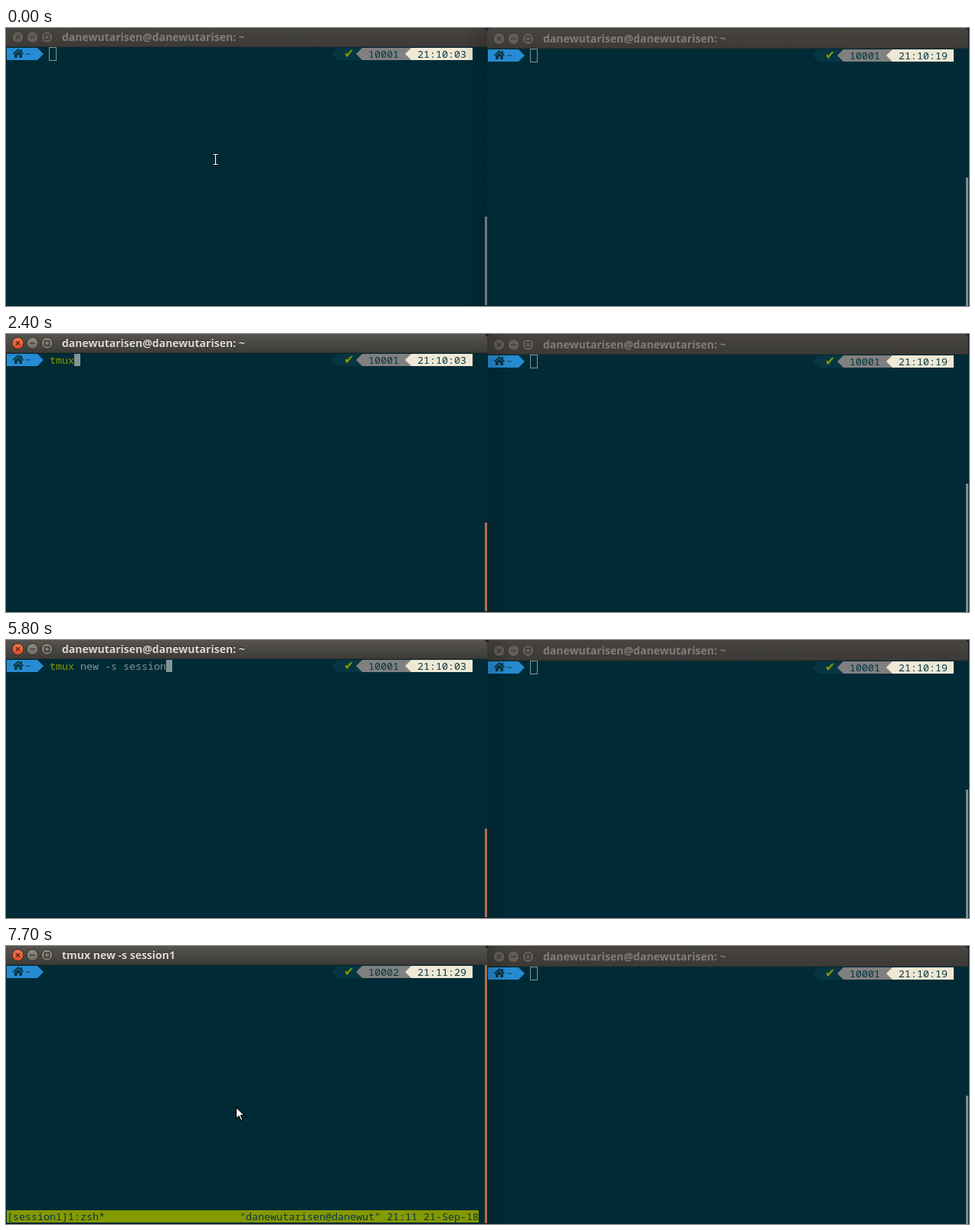
Recreate the animation shown at these times as an HTML page with a canvas. Size 1257 by 364 pixels, loop 8000 ms.

```html
<!DOCTYPE html>
<html lang="en">
<head>
<meta charset="utf-8">
<title>Two terminals</title>
<style>
  html, body { margin: 0; width: 1257px; height: 364px; overflow: hidden; background: #002b36; }
  canvas { display: block; }
</style>
</head>
<body>
<canvas id="stage" width="1257" height="364"></canvas>
<script>
const ctx = document.getElementById('stage').getContext('2d');
const LOOP = 8000;
const CELL = 8, ROW = 16;
const MONO = '13.333px "Noto Sans Mono", monospace';
const TITLE = 'bold 14px "Open Sans", sans-serif';
const USER = 'danewutarisen';
const HOST_TITLE = `${USER}@${USER}: ~`;
const COMMAND = 'tmux new -s session1';

const C = {
  bg: '#002b36', dark: '#073642', text: '#839496', green: '#859900', blue: '#268bd2',
  grey: '#808080', cream: '#eee8d5', error: '#cb4b16', scroll: '#7f9094', scrollOn: '#bb6a4b'
};

// [time, characters typed]
const KEYS = [
  [2000, 1], [2100, 2], [2300, 3], [2400, 4], [2800, 5], [3000, 6], [3100, 7], [3200, 8],
  [3600, 9], [3800, 10], [4600, 11], [4800, 12], [4900, 13], [5100, 14], [5500, 15],
  [5600, 16], [5700, 18], [5800, 19], [6700, 20]
];
const FOCUS = 800, ENTER = 7200, PROMPT = 7500;
const CURSOR_OFF = [[1300, 1900], [6400, 6700], [7700, 8000]];

function rect(x, y, w, h, color) {
  ctx.fillStyle = color;
  ctx.fillRect(x, y, w, h);
}

function poly(points, color) {
  ctx.fillStyle = color;
  ctx.beginPath();
  points.forEach(([x, y]) => ctx.lineTo(x, y));
  ctx.closePath();
  ctx.fill();
}

function write(text, x, y, color, font = MONO) {
  ctx.font = font;
  ctx.fillStyle = color;
  ctx.fillText(text, x, y);
}

function gradient(x0, y0, x1, y1, from, to) {
  const g = ctx.createLinearGradient(x0, y0, x1, y1);
  g.addColorStop(0, from);
  g.addColorStop(1, to);
  return g;
}

function button(x, y, kind, active) {
  const close = kind === 'close';
  ctx.fillStyle = !active ? '#625e57'
    : close ? gradient(0, y - 8, 0, y + 8, '#f47a55', '#e04a1e')
    : gradient(0, y - 8, 0, y + 8, '#8f8c82', '#6d6a61');
  ctx.strokeStyle = active ? '#2e2c28' : '#35332f';
  ctx.lineWidth = 1;
  ctx.beginPath();
  ctx.arc(x, y, 7.5, 0, Math.PI * 2);
  ctx.fill();
  ctx.stroke();

  ctx.strokeStyle = active ? (close ? '#5a1d0b' : '#35332e') : '#3a3833';
  ctx.lineWidth = 1.3;
  ctx.beginPath();
  if (close) {
    ctx.moveTo(x - 2.5, y - 2.5); ctx.lineTo(x + 2.5, y + 2.5);
    ctx.moveTo(x + 2.5, y - 2.5); ctx.lineTo(x - 2.5, y + 2.5);
  } else if (kind === 'min') {
    ctx.moveTo(x - 3.5, y); ctx.lineTo(x + 3.5, y);
  } else {
    ctx.rect(x - 3, y - 3, 6, 6);
  }
  ctx.stroke();
}

function titleBar(x, width, height, title, active) {
  const mid = height - 13;
  ctx.fillStyle = active
    ? gradient(0, 0, 0, height, '#56544d', '#3d3b37')
    : gradient(0, 0, 0, height, '#484540', '#3c3a36');
  ctx.beginPath();
  ctx.roundRect(x, 0, width, height, [x ? 5 : 0, 5, 0, 0]);
  ctx.fill();
  rect(x, height - 1, width, 1, '#33312d');
  button(x + 15.5, mid, 'close', active);
  button(x + 34.5, mid, 'min', active);
  button(x + 53.5, mid, 'max', active);
  if (active) write(title, x + 73, mid + 4, '#24231f', TITLE);
  write(title, x + 73, mid + 5, active ? '#dfdbd2' : '#807d78', TITLE);
}

function home(x, y) {
  ctx.strokeStyle = C.dark;
  ctx.lineWidth = 1.8;
  ctx.beginPath();
  ctx.moveTo(x + .5, y + 8);
  ctx.lineTo(x + 7, y + 2.3);
  ctx.lineTo(x + 13.5, y + 8);
  ctx.stroke();
  rect(x + 10, y + 2, 2, 4, C.dark);
  poly([[x + 2, y + 8.7], [x + 7, y + 4.4], [x + 12, y + 8.7], [x + 12, y + 13],
    [x + 8.3, y + 13], [x + 8.3, y + 9.5], [x + 5.7, y + 9.5], [x + 5.7, y + 13],
    [x + 2, y + 13]], C.dark);
}

function leftArrow(x, y, color) {
  poly([[x + CELL, y], [x, y + ROW / 2], [x + CELL, y + ROW]], color);
}

function prompt(x, y, count, clock) {
  const base = y + 13;
  rect(x, y, 40, ROW, C.blue);
  poly([[x + 40, y], [x + 48, y + ROW / 2], [x + 40, y + ROW]], C.blue);
  home(x + 8, y);
  write('~', x + 24, base, C.dark);

  leftArrow(x + 424, y, C.dark);
  rect(x + 432, y, 32, ROW, C.dark);
  write('✔', x + 440, base, C.green, '16px "DejaVu Sans", sans-serif');
  leftArrow(x + 456, y, C.grey);
  rect(x + 464, y, 64, ROW, C.grey);
  write(count, x + 472, base, C.dark);
  leftArrow(x + 520, y, C.cream);
  rect(x + 528, y, 80, ROW, C.cream);
  write(clock, x + 536, base, C.dark);
}

function hollowCursor(x, y) {
  ctx.strokeStyle = C.text;
  ctx.lineWidth = 1;
  ctx.strokeRect(x - .5, y - .5, CELL + 1, ROW + 1);
}

function command(x, y, t, typed) {
  const base = y + 13;
  const name = COMMAND.slice(0, Math.min(typed, 4));
  if (typed < 4) write(name, x, base, C.error, 'bold ' + MONO);
  else write(name, x, base, C.green);
  write(COMMAND.slice(4, typed), x + 4 * CELL, base, C.text);
  if (typed === 13) rect(x + 12 * CELL, base + 1, CELL, 1, C.text);
}

function statusBar(ready) {
  const name = ready ? `${USER}@${USER.slice(0, 7)}` : USER;
  const right = `"${name}" 21:11 21-Sep-18`;
  rect(1, 346, 616, ROW, C.green);
  write('[session1]1:zsh*', 1, 359, C.dark);
  write(right, 617 - right.length * CELL, 359, C.dark);
}

function beam(x, y) {
  const shape = () => {
    ctx.beginPath();
    ctx.moveTo(x - 2.5, y - 6.5); ctx.lineTo(x + 3.5, y - 6.5);
    ctx.moveTo(x - 2.5, y + 6.5); ctx.lineTo(x + 3.5, y + 6.5);
    ctx.moveTo(x + .5, y - 6.5); ctx.lineTo(x + .5, y + 6.5);
    ctx.stroke();
  };
  ctx.lineWidth = 3;
  ctx.strokeStyle = '#00141a';
  shape();
  ctx.lineWidth = 1.2;
  ctx.strokeStyle = '#fff';
  shape();
}

function arrow(x, y) {
  const points = [[0, 0], [0, 15], [3.6, 11.8], [6.2, 17.5], [8.6, 16.4], [6, 10.8], [10.5, 10.6]]
    .map(([dx, dy]) => [x + dx, y + dy]);
  poly(points, '#fff');
  ctx.strokeStyle = '#000';
  ctx.lineWidth = 1.2;
  ctx.stroke();
}

function pointer(t) {
  if (t >= ENTER) return arrow(300.5, 211);
  if (t >= 2000) return;
  const step = Math.max(0, Math.min(4, Math.floor(t / 100) - 1)) / 4;
  beam(Math.round(273 + 29 * step), 172 + 40 * step);
}

function leftWindow(t) {
  const active = t >= FOCUS, inside = t >= ENTER;
  const visible = !CURSOR_OFF.some(([from, to]) => t >= from && t < to);
  const typed = KEYS.reduce((n, [time, count]) => t >= time ? count : n, 0);
  let cursor = 57;

  titleBar(0, 628, 25, inside ? COMMAND : HOST_TITLE, active);
  if (!inside) {
    prompt(1, 26, '10001', '21:10:03');
    command(57, 26, t, typed);
    cursor += typed * CELL;
  } else {
    statusBar(t >= PROMPT);
    if (t >= PROMPT) prompt(1, 26, '10002', '21:11:29');
    else cursor = 1;
  }
  if (!active) hollowCursor(cursor, 26);
  else if (visible) rect(cursor, 26, CELL, ROW, C.text);

  const top = inside ? 25 : 247;
  rect(625, top, 3, 363 - top, active ? C.scrollOn : C.scroll);
  rect(0, 363, 628, 1, '#00202a');
}

function rightWindow() {
  titleBar(628, 628, 27, HOST_TITLE, false);
  prompt(629, 28, '10001', '21:10:19');
  hollowCursor(685, 28);
  rect(1253, 196, 3, 168, C.scroll);
  rect(1256, 0, 1, 364, '#0b1f2b');
}

function shadow(from, to) {
  rect(Math.min(from, to), 0, Math.abs(to - from), 364,
    gradient(from, 0, to, 0, 'rgba(0,0,0,.16)', 'rgba(0,0,0,0)'));
}

function draw(t) {
  rect(0, 0, 1257, 364, C.bg);
  rect(0, 0, 1257, 25, '#1f1d1c');
  if (t < FOCUS) {
    leftWindow(t);
    shadow(628, 597);
    rightWindow();
  } else {
    rightWindow();
    shadow(628, 659);
    leftWindow(t);
  }
  pointer(t);
}

const start = performance.now();
function tick() {
  draw((performance.now() - start) % LOOP);
  requestAnimationFrame(tick);
}
tick();
</script>
</body>
</html>
```
